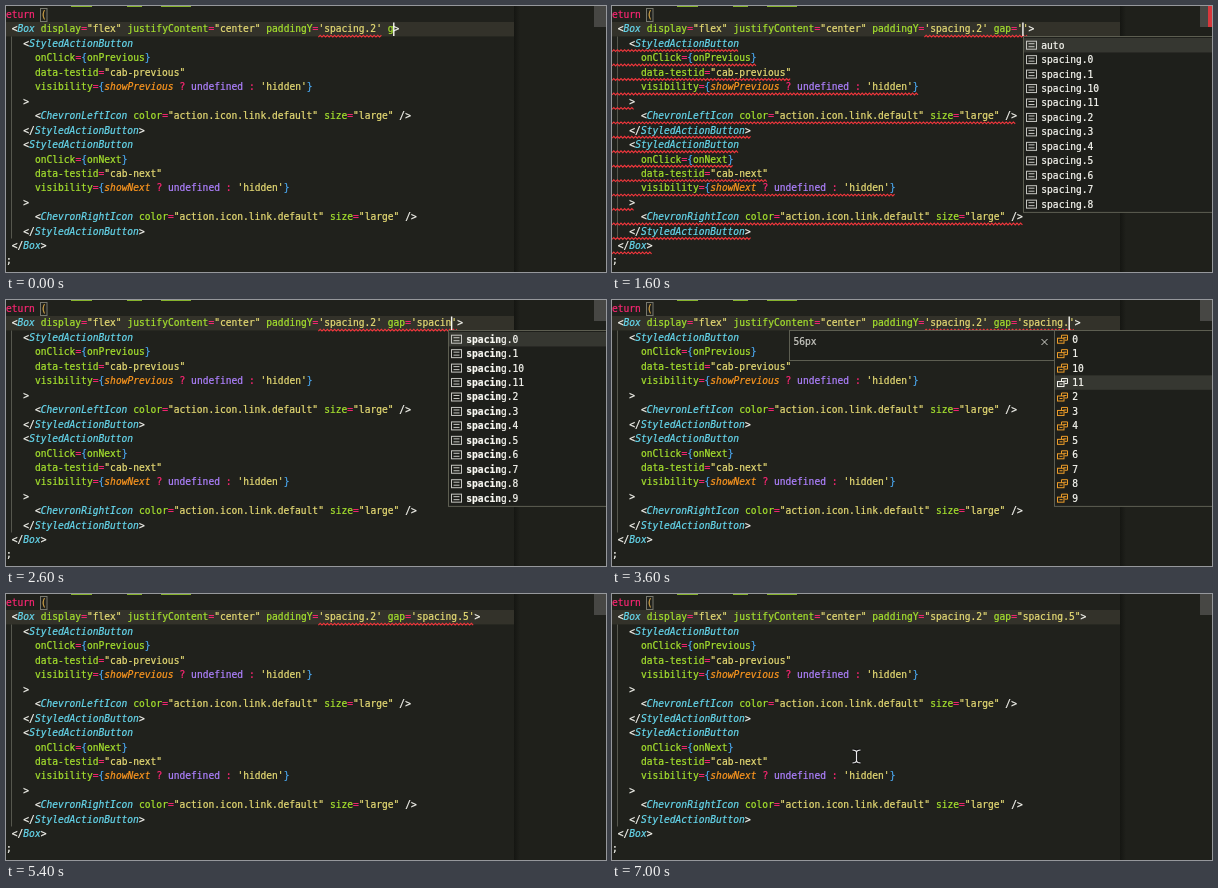
These frames come from a looping animation (600 px wide and 266 px high, 7.1 s). An HTML page with a canvas:

```html
<!DOCTYPE html>
<html lang="en">
<head>
<meta charset="utf-8">
<style>
html, body { margin: 0; width: 100%; height: 100%; overflow: hidden; background: #20211c; }
canvas { display: block; }
</style>
</head>
<body>
<canvas id="stage" width="600" height="266"></canvas>
<script>
const ctx = document.getElementById('stage').getContext('2d');
const LOOP = 7100, CHAR = 5.785, LEFT = -5.8, ROW = 14.45, TOP = 8.6;
const FONT = '9.6px "DejaVu Sans Mono", monospace';
const BG = '#20211c', WHITE = '#f8f8f2', PINK = '#f92672', GREEN = '#a6e22e', GOLD = '#e6c84a';

const colX = col => LEFT + col * CHAR;
const rowY = row => TOP + row * ROW;

const button = (name, side) => [
  '    <StyledActionButton',
  `      onClick={on${name}}`,
  `      data-testid="cab-${name.toLowerCase()}"`,
  `      visibility={show${name} ? undefined : 'hidden'}`,
  '    >',
  `      <Chevron${side}Icon color="action.icon.link.default" size="large" />`,
  '    </StyledActionButton>'
];
const body = [...button('Previous', 'Left'), ...button('Next', 'Right'), '  </Box>', ');'];

// Each entry: start time, text typed so far
const typing = [
  [0, 'g'], [200, 'ga'], [400, 'gap'], [700, 'gap='], [1000, "gap='"],
  [1700, "gap='s"], [1900, "gap='sp"], [2100, "gap='spa"], [2200, "gap='spac"],
  [2300, "gap='spaci"], [2500, "gap='spacin"], [2700, "gap='spacing"],
  [2900, "gap='spacing."], [4700, "gap='spacing.5"], [5900, 'gap="spacing.5"']
];

const steps = ['0', '1', '10', '11', '2', '3', '4', '5', '6', '7', '8', '9'];
const pixels = [0, 2, 48, 56, 4, 8, 12, 16, 20, 24, 32, 40];
const tokens = steps.map(s => 'spacing.' + s);
const props = ['gap?', 'rowGap?', 'columnGap?', 'gridTemplateAreas?', 'gridTemplate?',
  'gridTemplateRows?', 'gridTemplateColumns?'];
const gapDocs = ['(property) gap?: SpacingValueType | {',
  ...['base?: SpacingValueType | u…', 'xs?: SpacingValueType | und…', 's?: SpacingValueType | unde…',
    'm?: SpacingValueType | unde…', 'l?: SpacingValueType | unde…', 'xl?: SpacingValueType | und…'
  ].map(s => '    readonly ' + s),
  '} | undefined'];

const syntax = [
  [/^(Box|StyledActionButton|Chevron\w+)$/, '#66d9ef', 'italic '],
  [/^show/, '#fd971f', 'italic '],
  [/^["']/, '#e6db74'],
  [/^([=?:]|return)$/, PINK],
  [/^[{}]$/, '#4aa8f0'],
  [/^undefined$/, '#ae81ff'],
  [/^\($/, '#d8a848'],
  [/^[\w-]+$/, GREEN]
];

function rect(x, y, w, h, color) {
  ctx.fillStyle = color;
  ctx.fillRect(x, y, w, h);
}

// A hairline outline gives the glyphs a medium weight
function text(s, x, y, color, style = '') {
  ctx.font = style + FONT;
  ctx.fillStyle = ctx.strokeStyle = color;
  ctx.lineWidth = 0.22;
  ctx.fillText(s, x, y + 3.4);
  ctx.strokeText(s, x, y + 3.4);
}

function stroke(points, color, width = 1, closed = false) {
  ctx.beginPath();
  points.forEach(([x, y]) => ctx.lineTo(x, y));
  if (closed) ctx.closePath();
  ctx.strokeStyle = color;
  ctx.lineWidth = width;
  ctx.stroke();
}

function frame(x, y, w, h, color) {
  ctx.strokeStyle = color;
  ctx.lineWidth = 1;
  ctx.strokeRect(x, y, w, h);
}

function code(line, row, override) {
  for (const m of line.matchAll(/"[^"]*"|'[^']*'|<\/?|\/?>|[\w-]+|\S/g)) {
    const [, color = WHITE, style = ''] = syntax.find(([re]) => re.test(m[0])) || [];
    const forced = override && override(m[0], row);
    text(m[0], colX(m.index), rowY(row), forced || color, forced ? '' : style);
  }
}

// Colours while the opening tag is incomplete
function brokenColor(token, row) {
  if (row === 1) return token === '>' && PINK;
  if (row === 2) return PINK;
  if (row === 16) return token === '</' ? PINK : WHITE;
  return /[{}]/.test(token) && GOLD;
}

function squiggle(from, to, row) {
  const points = [], end = colX(to);
  for (let x = Math.max(0, colX(from)), i = 0; x < end; x += 1.8, i++) {
    points.push([x, rowY(row) + (i % 2 ? 6.2 : 8)]);
  }
  stroke(points, '#f0363c', 1.1);
}

function panel(x, y, w, h) {
  rect(x, y, w, h, '#1e1f1b');
  frame(x + 0.5, y + 0.5, w - 1, h - 1, '#5d5e51');
}

const icons = {
  cube(x, y, selected) {
    const color = selected ? WHITE : '#75beff';
    stroke([[x, y - 5], [x + 5, y - 2.5], [x + 5, y + 2.5], [x, y + 5], [x - 5, y + 2.5], [x - 5, y - 2.5]], color, 1, true);
    stroke([[x - 5, y - 2.5], [x, y], [x + 5, y - 2.5]], color);
    stroke([[x, y], [x, y + 5]], color);
  },
  label(x, y) {
    frame(x - 5, y - 4, 10, 8, '#c5c5c0');
    rect(x - 3, y - 2, 6, 1, '#c5c5c0');
    rect(x - 3, y + 1, 6, 1, '#c5c5c0');
  },
  member(x, y, selected) {
    const color = selected ? WHITE : '#ee9d28';
    stroke([[x - 1, y - 1], [x - 1, y - 4], [x + 5, y - 4], [x + 5, y + 1], [x + 2, y + 1]], color);
    frame(x - 5, y - 1, 6.5, 5, color);
    rect(x - 3, y + 1, 3, 1, color);
    rect(x + 1, y - 2, 3, 1, color);
  }
};

function list(x, items, icon, selected = 0, match = 0) {
  panel(x, 30, 160 + 442 - x, items.length * ROW + 3.5);
  items.forEach((item, i) => {
    const y = 39.2 + i * ROW;
    if (i === selected) rect(x + 1, y - 7.2, 600 - x, ROW, '#363731');
    icons[icon](x + 8.5, y, i === selected);
    text(item.slice(0, match), x + 18.3, y, WHITE, 'bold ');
    text(item.slice(match), x + 18.3 + match * CHAR, y, WHITE);
  });
}

function docs(right, lines, height) {
  const x = right - 265;
  panel(x, 30, 266, height);
  lines.forEach((line, i) => text(line, x + 4.5, 42 + i * ROW, '#c8c8c2'));
  const cx = right - 9.5, cy = 42;
  stroke([[cx - 3, cy - 3], [cx + 3, cy + 3]], '#d0d0ca');
  stroke([[cx + 3, cy - 3], [cx - 3, cy + 3]], '#d0d0ca');
}

function pointer(x, y) {
  for (const [color, width] of [['#111', 3], ['#eee', 1.2]]) {
    stroke([[x, y - 5], [x, y + 5]], color, width);
    for (const side of [-1, 1]) {
      stroke([[x - 4, y + 6.5 * side], [x - 1.5, y + 6 * side], [x, y + 5 * side],
        [x + 1.5, y + 6 * side], [x + 4, y + 6.5 * side]], color, width);
    }
  }
}

function draw(t) {
  const typed = typing.filter(([start]) => start <= t).pop()[1];
  const saved = t >= 5900, broken = t >= 700 && t < 1000, allWrong = t >= 1200 && t < 2000;
  const quote = saved ? '"' : "'";
  const head = `  <Box display="flex" justifyContent="center" paddingY=${quote}spacing.2${quote} ${typed}`;
  const cursor = colX(head.length);
  const open = !saved && typed.includes("'");

  rect(0, 0, 600, 266, BG);
  rect(0, 16, 508, 14.4, '#33322a');
  const shade = ctx.createLinearGradient(508, 0, 514, 0);
  shade.addColorStop(0, '#151612');
  shade.addColorStop(1, '#1f201b');
  rect(508, 0, 92, 266, shade);
  rect(588, 0, 12, 21, '#474744');
  if (allWrong) rect(596, 0, 4, 21, '#d8383c');
  rect(5, 30.5, 1, 202, '#56574e');
  for (const [x, w] of [[65, 21], [121, 15], [155, 30]]) rect(x, 0, w, 1, '#86b32c');

  code('return (', 0);
  frame(34.5, 2.5, 6.5, 13, '#77786e');
  const override = broken && brokenColor;
  code(head + (open ? "'" : '') + '>', 1, override);
  body.forEach((line, i) => code(line, i + 2, override));

  if (broken) {
    squiggle(67, 70, 1);
    squiggle(71, 72, 1);
  } else if (!saved) {
    squiggle(55, open ? head.length + 1 : 66, 1);
  }
  if (allWrong) body.slice(0, -1).forEach((line, i) => squiggle(0, line.length, i + 2));

  const x = Math.min(Math.round(cursor), 442);
  if (t >= 200 && t < 800) {
    docs(x, gapDocs, 130);
    list(x, props, 'cube');
  } else if (t >= 1200 && t < 1700) {
    list(x, ['auto', ...tokens.slice(0, 11)], 'label');
  } else if (t >= 1700 && t < 2900) {
    list(x, tokens, 'label', 0, typed.length - 5);
  } else if (t >= 2900 && t < 4700) {
    const selected = t < 3300 ? 0 : Math.min(7, 1 + Math.floor((t - 3300) / 140));
    docs(x, [pixels[selected] + 'px'], 31);
    list(x, steps, 'member', selected);
  }

  const hidden = (t >= 5200 && t < 5700) || t >= 6600;
  if (!hidden) rect(cursor - 0.5, 16.5, 1.4, 13.5, WHITE);
  if (t >= 6700) pointer(244.5, 162.5);
}

function tick() {
  draw(performance.now() % LOOP);
  requestAnimationFrame(tick);
}
tick();
</script>
</body>
</html>
```
